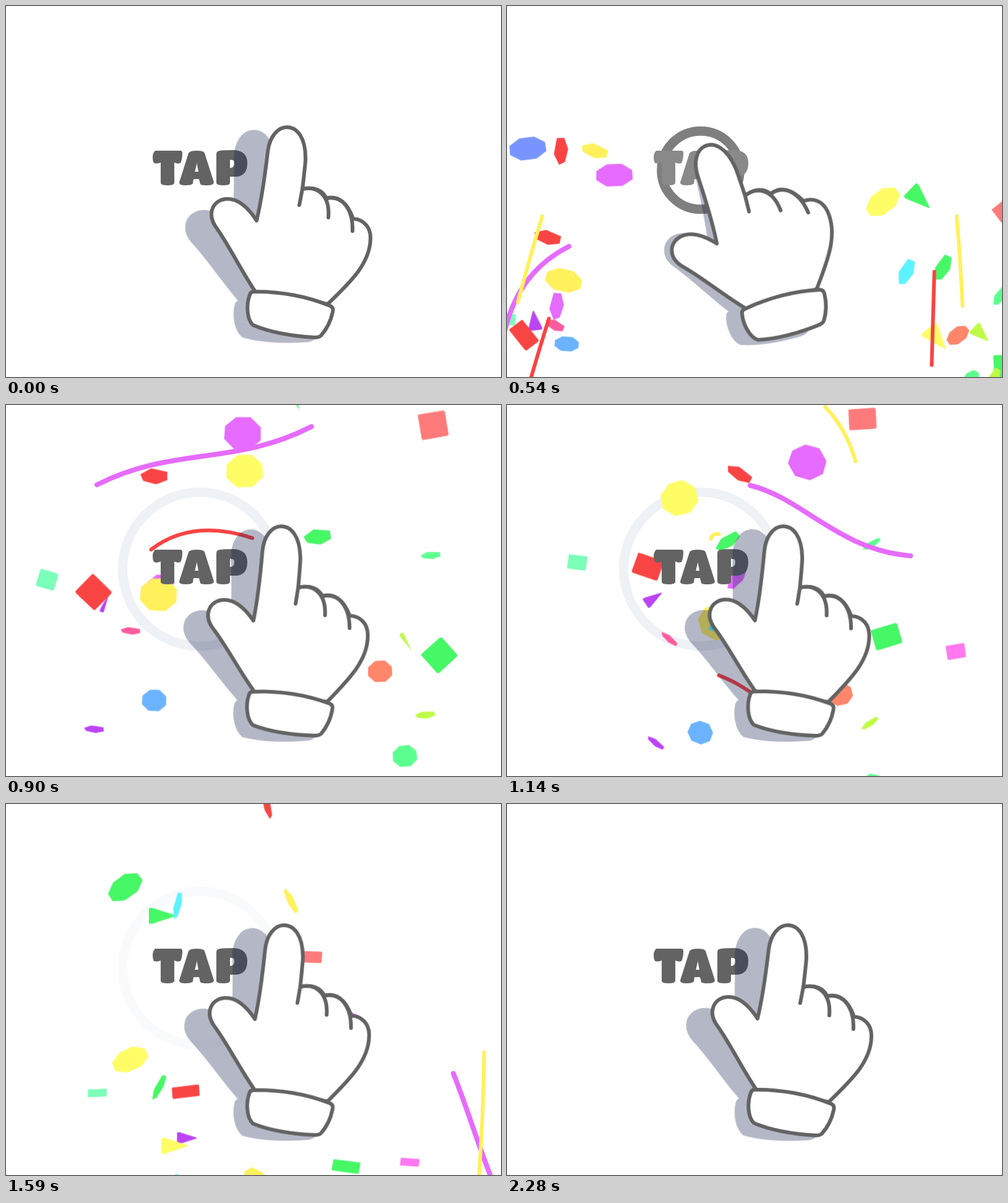
An HTML page without scripts for the animation above (2310 ms loop, 800 px wide and 600 px high).

```html
<!DOCTYPE html>
<html lang="en">
<head>
<meta charset="utf-8">
<title>Tap</title>
<style>
html, body { margin: 0; width: 100%; height: 100%; overflow: hidden; background: #fff; }
.stage { position: relative; width: 800px; height: 600px; overflow: hidden; }
svg, .fall { position: absolute; inset: 0; }
svg { width: 800px; height: 600px; fill: none; stroke-linecap: round; stroke-linejoin: round; }
.stage * { animation-duration: 2310ms; animation-iteration-count: infinite; animation-timing-function: linear; }

.ring { stroke-width: 15; animation-name: ring; }
@keyframes ring {
  0%, 19% { r: 40px; stroke: #636363; opacity: 0; }
  21% { opacity: 1; }
  28.57% { r: 90.5px; stroke: #a0a0a0; }
  36.5% { r: 124.5px; stroke: #eef1f6; }
  63% { r: 124.5px; stroke: #eef1f6; opacity: 1; }
  72%, to { r: 124.5px; stroke: #eef1f6; opacity: 0; }
}

.label { fill: #636363; fill-rule: evenodd; animation-name: flash; }
.label text { font: 900 68px Inter, sans-serif; }
@keyframes flash {
  0%, 19%, 36%, to { fill: #636363; }
  25%, 29% { fill: #969698; }
}

.hand, .shadow { transform-origin: 456px 514px; }
.hand { fill: #fff; stroke: #636363; stroke-width: 6; animation-name: press; }
.hand .line { fill: none; }
.shadow { opacity: .32; animation-name: shade; }
.shadow use { fill: #182450; stroke: #182450; stroke-width: 6; }
@keyframes press {
  0% { transform: rotate(0); animation-timing-function: ease-in-out; }
  13.5%, 29% { transform: rotate(-25deg); animation-timing-function: ease-out; }
  38.5% { transform: rotate(-1.8deg); }
  to { transform: rotate(0); }
}
@keyframes shade {
  0% { transform: translate(-15px, 10px) rotate(-7.4deg) scale(1.017); animation-timing-function: ease-in-out; }
  13.5%, 29% { transform: translate(-27px, 11px) rotate(-19.5deg) scale(.97); animation-timing-function: ease-out; }
  38.5% { transform: translate(-15px, 10px) rotate(-8.4deg) scale(1.017); }
  to { transform: translate(-15px, 10px) rotate(-7.4deg) scale(1.017); }
}

/* All pieces share one gravity curve; each adds its own drift and lift, slowed by drag. */
.fall { animation-name: gravity; }
@keyframes gravity {
  0%, 28.57% { transform: none; opacity: 1; animation-timing-function: cubic-bezier(.333, 0, .667, .333); }
  93.5% { opacity: 1; animation-timing-function: step-start; }
  to { transform: translateY(1225px); opacity: 0; }
}
.left { --sx: -60px; --sy: 640px; }
.right { --sx: 860px; --sy: 640px; }
.above { --sx: 240px; --sy: -330px; }

/* --mid and --late scale the angle as a piece turns, --open and --shut its tilt. */
i {
  --s: 59px; --mid: .1; --late: 1.6; --open: .9; --shut: .95;
  --drag: cubic-bezier(.333, .667, .667, 1);
  position: absolute; width: var(--s); height: var(--s);
  margin: calc(var(--s) / -2); background: var(--c);
  clip-path: polygon(30% 2%, 70% 0, 99% 30%, 100% 70%, 71% 99%, 29% 100%, 0 70%, 1% 30%);
  animation-name: drift, lift, tumble;
}
.small { --s: 39px; }
.tri, .hex { --drag: cubic-bezier(.32, .25, .52, 1); }
.tri {
  --s: 50px; --mid: .9; --late: 0; --open: .2; --shut: .8;
  clip-path: polygon(12% 4%, 20% 0, 97% 46%, 97% 53%, 20% 100%, 12% 96%);
}
.quad {
  --s: 45px; --mid: .6; --late: -.1; --open: .95; --shut: .6;
  --drag: cubic-bezier(.4, .1, .5, 1);
  clip-path: polygon(5% 0, 95% 2%, 100% 8%, 98% 95%, 92% 100%, 4% 98%, 0 92%, 2% 4%);
}
.hex {
  --s: 44px; --open: .7; --shut: .4;
  clip-path: polygon(0 45%, 38% 10%, 98% 22%, 100% 66%, 60% 92%, 12% 78%);
}
.tri.small { --s: 37px; }
.quad.small { --s: 31px; }
.hex.small { --s: 32px; --open: .45; --shut: .3; }
@keyframes drift {
  0%, 19% { left: var(--sx); animation-timing-function: ease-out; }
  28.57% { left: calc(var(--x) * 1px); animation-timing-function: var(--drag); }
  80.52%, to { left: calc((var(--x) + var(--dx)) * 1px); }
}
@keyframes lift {
  0%, 19% { top: var(--sy); animation-timing-function: ease-out; }
  28.57% { top: calc(var(--y) * 1px); animation-timing-function: cubic-bezier(.333, 1, .667, 1); }
  80.52%, to { top: calc((var(--y) + var(--dy)) * 1px); }
}
@keyframes tumble {
  0%, 19% { transform: rotate(calc(var(--a) * 1deg - 40deg)) scaleY(.9); }
  28.57% { transform: rotate(calc(var(--a) * 1deg)) scaleY(.3); }
  38.96% { transform: rotate(calc(var(--a) * var(--mid) * 1deg)) scaleY(var(--open)); }
  59.74% { transform: rotate(calc(var(--a) * var(--late) * 1deg)) scaleY(var(--shut)); }
  77.92%, to { transform: rotate(calc(var(--a) * var(--late) * 1deg)) scaleY(.26); }
}
</style>
</head>
<body>
<div class="stage">
  <svg><circle class="ring" cx="313" cy="265.5"/></svg>

  <div class="fall left">
    <i style="--x:85;--y:3;--dx:119;--dy:-482;--a:15;--c:#7895ff"></i>
    <i class="hex" style="--x:169;--y:10;--dx:261;--dy:-402;--a:-65;--c:#f94444"></i>
    <i class="hex" style="--x:253;--y:8;--dx:214;--dy:-245;--a:40;--c:#fff15c"></i>
    <i style="--x:303;--y:69;--dx:267;--dy:-102;--a:20;--c:#e66bff"></i>
    <i class="hex" style="--x:158;--y:400;--dx:311;--dy:-285;--a:-60;--c:#e66bff"></i>
    <i style="--x:175;--y:334;--dx:240;--dy:-110;--a:35;--c:#fff15c"></i>
    <i class="hex" style="--x:134;--y:226;--dx:352;--dy:-279;--a:38;--c:#f94444"></i>
    <i class="tri small" style="--x:102;--y:439;--dx:195;--dy:-292;--a:-75;--c:#bb44f7"></i>
    <i class="hex small" style="--x:66;--y:593;--dx:255;--dy:-193;--a:45;--c:#bb44f7"></i>
    <i class="quad small" style="--x:31;--y:433;--dx:120;--dy:-360;--a:26;--c:#7bffb9"></i>
    <i class="quad" style="--x:76;--y:473;--dx:221;--dy:-402;--a:72;--c:#f94444"></i>
    <i class="small" style="--x:183;--y:495;--dx:189;--dy:-88;--a:26;--c:#6bb3ff"></i>
    <i class="hex small" style="--x:153;--y:447;--dx:160;--dy:-220;--a:48;--c:#ff5c9e"></i>
  </div>
  <div class="fall right">
    <i style="--x:467;--y:137;--dx:-275;--dy:-115;--a:-15;--c:#fffd66"></i>
    <i class="tri" style="--x:556;--y:127;--dx:-316;--dy:-340;--a:65;--c:#46f766"></i>
    <i class="quad" style="--x:780;--y:152;--dx:-301;--dy:-298;--a:-18;--c:#ff7b7b"></i>
    <i class="hex" style="--x:525;--y:315;--dx:-264;--dy:-87;--a:-40;--c:#5cf2ff"></i>
    <i class="hex" style="--x:617;--y:304;--dx:-382;--dy:-238;--a:-39;--c:#46f766"></i>
    <i class="hex small" style="--x:760;--y:376;--dx:-250;--dy:-325;--a:-35;--c:#5cff8f"></i>
    <i class="tri" style="--x:600;--y:478;--dx:-341;--dy:-319;--a:72;--c:#fffd66"></i>
    <i class="small" style="--x:655;--y:473;--dx:-170;--dy:-140;--a:-15;--c:#ff856b"></i>
    <i class="tri small" style="--x:711;--y:468;--dx:-222;--dy:-230;--a:65;--c:#bffb46"></i>
    <i class="quad" style="--x:767;--y:557;--dx:-224;--dy:-365;--a:-72;--c:#46f766"></i>
    <i class="small" style="--x:687;--y:590;--dx:-142;--dy:-100;--a:-38;--c:#5cff8f"></i>
    <i class="hex small" style="--x:747;--y:580;--dx:-235;--dy:-215;--a:-40;--c:#bffb46"></i>
    <i class="quad small" style="--x:900;--y:700;--dx:-255;--dy:-516;--a:-40;--c:#ff78f0"></i>
  </div>
  <div class="fall above">
    <i style="--x:330;--y:-453;--dx:-142;--dy:200;--a:-22;--c:#46f766"></i>
    <i class="hex" style="--x:170;--y:-818;--dx:110;--dy:600;--a:-48;--c:#5cf2ff"></i>
  </div>

  <svg>
    <g stroke-width="6">
      <path stroke="#e66bff" stroke-width="8">
        <animate attributeName="d" dur="2310ms" repeatCount="indefinite" keyTimes="0;.19;.2857;.3896;.5974;.75;1" values="M-20 640C-30 680 -40 720 -50 800;M-20 640C-30 680 -40 720 -50 800;M240 96C110 122 35 200 28 348;M493 34C370 98 270 66 146 129;M810 452C700 370 685 235 638 131;M900 950C850 850 820 750 780 640;M900 950C850 850 820 750 780 640"/>
      </path>
      <path stroke="#fff15c">
        <animate attributeName="d" dur="2310ms" repeatCount="indefinite" keyTimes="0;.19;.2857;.3896;.5974;.75;1" values="M-20 640Q-40 700 -60 780;M-20 640Q-40 700 -60 780;M147 -10Q128 58 108 128;M430 -200Q370 -130 310 -40;M695 380Q728 210 717 46;M790 980Q800 800 810 640;M790 980Q800 800 810 640"/>
      </path>
      <path stroke="#f94444">
        <animate attributeName="d" dur="2310ms" repeatCount="indefinite" keyTimes="0;.19;.2857;.3896;.5974;1" values="M-20 640Q-40 700 -60 780;M-20 640Q-40 700 -60 780;M170 349Q145 431 120 514;M398 214Q300 182 234 233;M500 800Q470 720 450 640;M500 800Q470 720 450 640"/>
      </path>
      <path stroke="#f94444">
        <animate attributeName="d" dur="2310ms" repeatCount="indefinite" keyTimes="0;.19;.2857;.38;1" values="M820 640L830 800;M820 640L830 800;M540 185L519 325;M440 -180L480 -40;M440 -180L480 -40"/>
      </path>
      <path stroke="#fff15c">
        <animate attributeName="d" dur="2310ms" repeatCount="indefinite" keyTimes="0;.19;.2857;.3896;.5974;.7;1" values="M820 640Q825 700 830 800;M820 640Q825 700 830 800;M618 -10Q624 54 627 118;M420 -170Q450 -100 480 -30;M240 600Q215 510 206 446;M190 900Q180 750 170 640;M190 900Q180 750 170 640"/>
      </path>
    </g>

    <g class="label">
      <text x="239 283 342" y="287">TAP</text>
      <path d="M241 234H282Q285 234 285 238Q285 248 282 254Q277 256 272 253V286Q272 290 261 290Q250 290 250 286V253Q245 256 239 254Q237 250 237 245Q237 238 241 234Z"/>
      <path d="M295 238Q297 234 308 234Q320 234 321 238L336 285Q336 290 325 290Q315 290 314 288L312 280H303L302 287Q300 290 290 290Q279 290 280 285ZM308 252L305 268H311Z"/>
      <path d="M340 240Q340 234 346 234Q352 233 368 233Q390 234 390 254Q390 275 372 276H362V286Q362 290 351 290Q340 290 340 286ZM362 247V262Q369 262 369 254Q369 247 362 247Z"/>
    </g>

    <defs>
      <path id="palm" d="M403 462C380 428 362 390 341 360C322 335 336 312 358 312C378 312 394 330 405 347C413 314 419 270 423 236C426 210 440 196 454 196C470 196 485 212 484 250C483 262 481 280 479 296C497 292 511 297 518 311C537 306 552 318 561 344C578 345 590 358 589 377C588 420 550 452 520 482Z"/>
      <path id="cuff" d="M399 462C443 461 488 470 524 485Q530 488 528 495C525 509 518 523 509 533Q506 536 499 536C464 534 430 529 399 516C389 506 388 483 394 467Q395 463 399 462Z"/>
    </defs>
    <g class="shadow"><use href="#palm"/><use href="#cuff"/></g>
    <g class="hand">
      <use href="#palm"/>
      <path class="line" d="M479 296L474 322M479 296C503 290 524 306 521 342M518 311C545 306 561 330 560 364"/>
      <use href="#cuff"/>
    </g>
  </svg>
</div>
</body>
</html>
```
